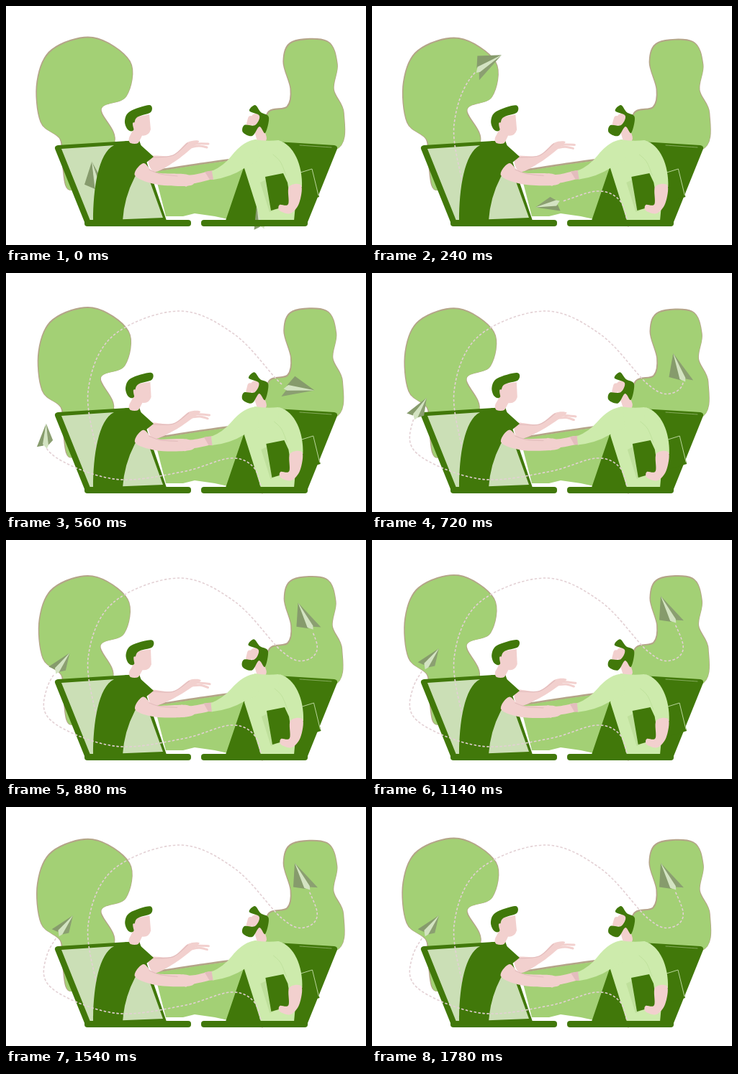
An HTML page for the animation above (1800 ms loop, 500 by 333 pixels).

```html
<!DOCTYPE html>
<html>
<head>
<meta charset="utf-8">
<style>
html, body { margin: 0; width: 100%; height: 100%; overflow: hidden; background: #fff }
svg { display: block; width: 500px; height: 333px }
.trail { fill: none; stroke: #e3d0d4; stroke-width: 1.6 }
.limb { fill: none; stroke-linecap: round; stroke-linejoin: round }
</style>
</head>
<body>
<svg id="stage" viewBox="0 0 500 333"></svg>
<script>
const LEAF = '#a3d075', DARK = '#41780a', SHIRT = '#cdebac', SKIN = '#f2d0ce',
      SHADE = '#e3bdbd', GLASS = '#cbdfb6', RIM = '#b4a488', PALE = '#d3e3c2';
const LOOP = 1800, FLIGHT = 1080;

// Smooth curve through a few key points, closed unless open is set.
function curve(text, open) {
  const p = text.split(' ').map(s => s.split(',').map(Number)), n = p.length;
  const at = i => open ? p[Math.max(0, Math.min(n - 1, i))] : p[(i + n) % n];
  let d = 'M' + p[0];
  for (let i = 0; i < (open ? n - 1 : n); i++) {
    const [a, b, c, e] = [at(i - 1), at(i), at(i + 1), at(i + 2)];
    const c1 = b.map((v, k) => v + (c[k] - a[k]) / 6);
    const c2 = c.map((v, k) => v - (e[k] - b[k]) / 6);
    d += `C${c1} ${c2} ${c}`;
  }
  return d + (open ? '' : 'Z');
}
const path = (fill, d) => `<path fill="${fill}" d="${d}"/>`;
const blob = (fill, pts) => path(fill, curve(pts));
const poly = (fill, pts) => `<polygon fill="${fill}" points="${pts}"/>`;
const limb = (color, width, pts) =>
  `<path class="limb" stroke="${color}" stroke-width="${width}" d="${curve(pts, true)}"/>`;
const group = (id, ...parts) => `<g id="${id}">${parts.join('')}</g>`;
const mirror = shape => `${shape}<g transform="translate(528) scale(-1 1)">${shape}</g>`;
const tree = (id, pts) => group(id,
  `<path d="${curve(pts)}" fill="${RIM}" stroke="${RIM}" stroke-width="2.4" transform="translate(-.4 -.8)"/>`,
  blob(LEAF, pts));
const trail = (id, pts) => `<path id="${id}" class="trail" d="${curve(pts, true)}"/>`;

// Paper plane with its tail at the origin, pointing along +x.
const plane = (id, nose, left, right) => group(id,
  poly('#869b6c', `${nose},0 ${left} 1,-3`),
  poly('#8b9f71', `${nose},0 1,3 ${right}`),
  poly(PALE, `${nose},0 3,-4 -3,2 2,4`));

stage.innerHTML = [
  tree('treeL', '76,186 49,162 44,106 64,62 121,45 172,78 167,126 132,144 150,192 92,256 79,220'),
  tree('treeR', '362,192 364,150 391,141 396,116 386,78 398,51 446,50 460,82 455,117 469,150 458,200'),
  limb(RIM, 3, '206,230 270,220 336,211'),
  poly(LEAF, '206,231 270,221 336,212 308,297 290,293 262,289 246,293 222,293'),

  mirror(path(DARK, 'M72 194L185 187L223 299L118 306Q111 306 109 301L68 199Q67 195 72 194Z')),
  poly(GLASS, '77,199 181,192 218,295 117,299'),
  limb('#8db066', .9, '408,194 452,197'),

  trail('trailB', '128,256 114,165 148,88 240,53 318,86 383,155 414,168 432,146 401,78'),
  plane('planeB', 40, '11,-17', '-5,13'),

  // left man
  group('wave',
    blob(SKIN, '199,210 231,208 252,190 268,188 258,198 234,217 206,231'),
    limb(SKIN, 3, '254,194 266,192 281,192'),
    limb(SKIN, 3, '256,197 268,195 279,197'),
    limb(SHADE, 1.2, '204,211 232,208 252,191')),
  group('headL',
    limb(SKIN, 15, '183,165 183,175 178,186'),
    path(SKIN, 'M179 155L199 151L201 172Q198 183 186 180Z'),
    blob(DARK, '165,160 172,147 199,138 201,148 181,156 177,173 169,172'),
    blob(SKIN, '176,163 181,164 178,172')),
  path(DARK, 'M167 188Q176 194 184 191L205 210L190 222L179 238Q164 267 162 299H121C121 255 128 205 150 194Z'),
  group('shakeL',
    blob(SKIN, '191,219 208,232 252,235 261,247 246,251 206,248 179,236'),
    limb(SHADE, 1.2, '199,228 214,234 238,237')),

  plane('planeA', 32, '-1,-12', '9,10'),

  // right man
  group('headR',
    limb(SKIN, 14, '347,157 351,170 355,184'),
    limb(SKIN, 8, '340,157 338,164'),
    blob(DARK, '338,146 346,138 354,148 365,155 360,177 352,168 342,181 329,176 331,166 346,166 352,153')),
  group('side',
    poly(DARK, '405,233 425,226 435,266 402,276'),
    `<polyline fill="none" stroke="#b9d59b" points="409,232 425,227 434,264"/>`),
  path(SHIRT, 'M345 186Q362 189 378 187Q398 194 403 215L404 255L400 299H354L331 226Z'),
  group('shakeR',
    limb(SKIN, 12, '283,236 262,241 246,242'),
    limb(SKIN, 5, '250,249 240,243 246,237'),
    poly(SHADE, '276,231 288,229 289,242 283,242'),
    path(SHIRT, 'M348 186Q330 187 313 209Q302 223 286 230L288 242Q313 238 331 226L352 215Z')),
  group('hold',
    path(SHIRT, 'M378 187C400 193 412 222 411 252L392 254L376 212Z'),
    limb('#bbdf98', .8, '371,207 381,217 389,236'),
    poly('#bfe09c', '353,246 361,242 372,285 366,287'),
    poly(DARK, '360,238 385,233 391,246 396,277 368,285'),
    blob(SKIN, '393,252 410,250 407,275 395,289 380,285 380,277 392,276')),

  trail('trailA', '356,308 345,272 312,258 245,277 150,287 63,252 57,206 93,151'),
  mirror(`<rect x="109" y="298" width="148" height="9" rx="4" fill="${DARK}"/>`)
].join('');

const el = id => document.getElementById(id);
const move = (id, value) => el(id).setAttribute('transform', value);

// cubic-bezier(.31, .1, .2, 1)
function ease(x) {
  const bez = (u, a, b) => 3 * (1 - u) * u * ((1 - u) * a + u * b) + u ** 3;
  let lo = 0, hi = 1;
  for (let i = 0; i < 20; i++) {
    const mid = (lo + hi) / 2;
    if (bez(mid, .31, .2) < x) lo = mid; else hi = mid;
  }
  return bez(hi, .1, 1);
}

// Tail and nose both ride the path; the trail ends at the tail.
function fly(name, p, nose) {
  const route = el('trail' + name), d = p * (route.getTotalLength() - nose);
  const a = route.getPointAtLength(d), b = route.getPointAtLength(d + nose);
  const angle = Math.atan2(b.y - a.y, b.x - a.x) * 180 / Math.PI;
  move('plane' + name, `translate(${a.x} ${a.y}) rotate(${angle})`);
  route.setAttribute('stroke-dasharray', '3.5 2.5 '.repeat(d / 6) + '0 2000');
}

const shrink = (id, x, y, sx, sy) =>
  move(id, `translate(${x} ${y}) scale(${sx} ${sy}) translate(${-x} ${-y})`);

function draw() {
  const t = performance.now() % LOOP;
  const k = (1 - Math.cos(2 * Math.PI * t / LOOP)) / 2;
  shrink('treeL', 109, 290, 1 - .05 * k, 1 - .026 * k);
  shrink('treeR', 412, 290, 1 - .045 * k, 1 - .021 * k);
  move('wave', `rotate(${6.5 * k} 205 215)`);
  move('headL', `rotate(${3 * k} 178 190)`);
  move('headR', `rotate(${-2 * k} 355 187)`);
  move('shakeL', `rotate(${-4 * k} 185 228)`);
  move('shakeR', `rotate(${3 * k} 340 200)`);
  move('hold', `translate(${2 * k} 0)`);
  move('side', `translate(${2.5 * k} 0)`);
  const p = ease(Math.min(1, t / FLIGHT));
  fly('A', p, 32);
  fly('B', p, 40);
  requestAnimationFrame(draw);
}
draw();
</script>
</body>
</html>
```
